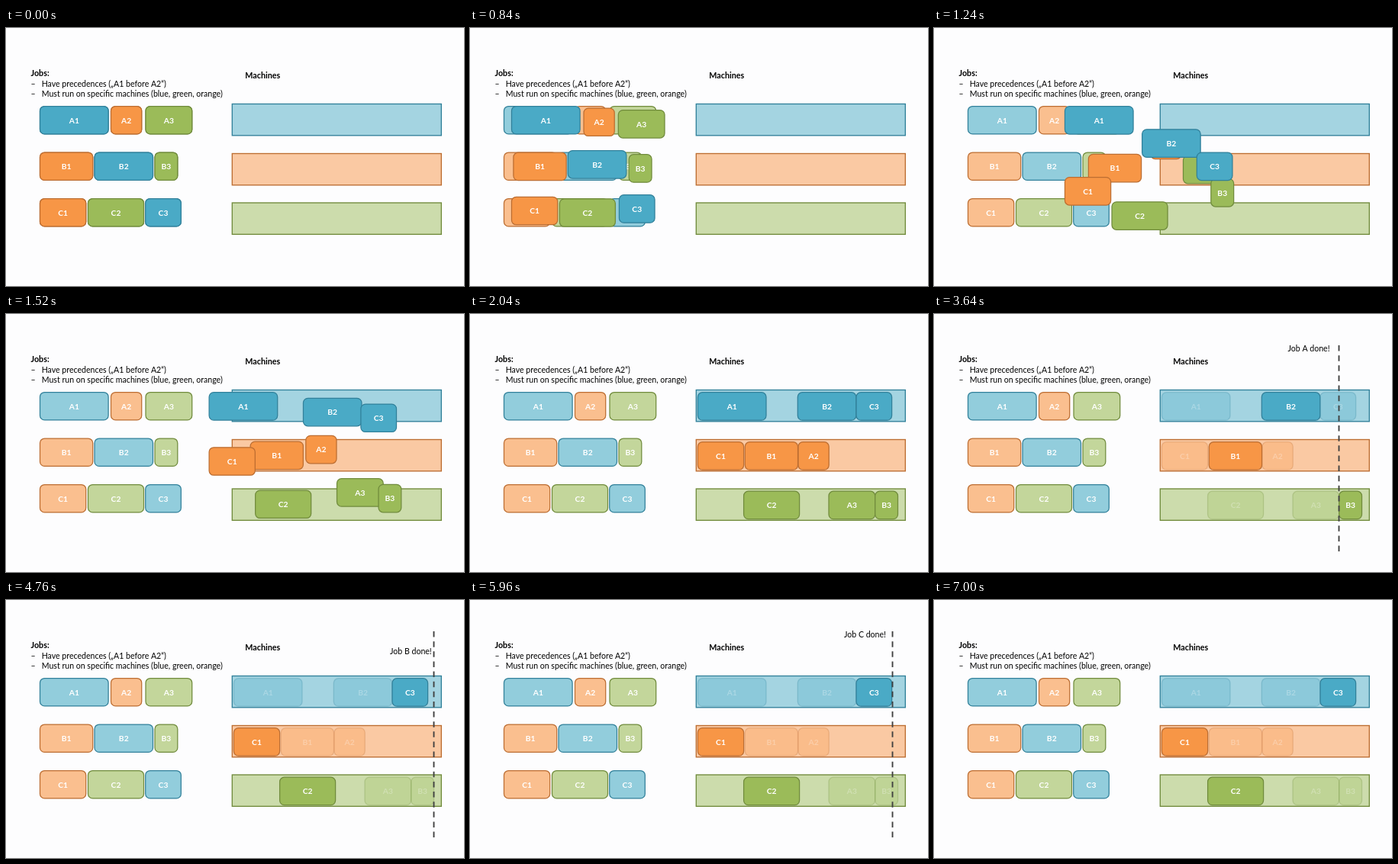
An HTML page with a canvas that plays this animation: 600 px wide and 338 px high, repeating every 7040 ms.

```html
<!DOCTYPE html>
<html lang="en">
<head>
<meta charset="utf-8">
<title>Job shop scheduling</title>
<style>
html, body { margin: 0; width: 100%; height: 100%; overflow: hidden; background: #fdfdfe; }
canvas { display: block; width: 600px; height: 338px; }
</style>
</head>
<body>
<canvas id="stage" width="600" height="338"></canvas>
<script>
const ctx = document.getElementById('stage').getContext('2d');
const LOOP = 7040, STEP = 40, FADE = 520;
const MOVE_START = 628, MOVE_END = 1852;
const FAMILY = 'Lato, "Open Sans", sans-serif';
const HEADING = `bold 10.75px ${FAMILY}`;
const BODY = `10.58px ${FAMILY}`;
const LABEL = `bold 10.3px ${FAMILY}`;

const colors = {
  blue: { fill: '#4aaac6', pale: '#92cddc', bar: '#a4d4e1', edge: '#31809a' },
  orange: { fill: '#f79646', pale: '#fabf8f', bar: '#fac9a3', edge: '#bc6d31' },
  green: { fill: '#9bbb59', pale: '#c3d69b', bar: '#ccdcac', edge: '#708b3c' }
};
const barTop = { blue: 99.5, orange: 164.5, green: 229 };
const rowTop = { A: 102.5, B: 163, C: 223.5 };

// name, color, start x, width, scheduled x
const tasks = [
  ['A1', 'blue', 44.5, 89.6, 298.4],
  ['A2', 'orange', 137.5, 40.2, 430],
  ['A3', 'green', 183, 60.7, 470],
  ['B1', 'orange', 44.5, 69.2, 360.3],
  ['B2', 'blue', 116, 76.5, 429.3],
  ['B3', 'green', 195, 29.8, 530.7],
  ['C1', 'orange', 44.5, 60.2, 298.4],
  ['C2', 'green', 107.5, 73, 358.6],
  ['C3', 'blue', 182.7, 46.6, 506]
].map(([name, color, x, w, toX]) => ({
  name, color, x, w, toX, job: name[0],
  y: rowTop[name[0]], toY: barTop[color] + 3.2
}));

const markers = [
  { job: 'A', x: 530.5, labelX: 463.5, labelY: 49, from: 2520, to: 3640 },
  { job: 'B', x: 560.5, labelX: 503, labelY: 71, from: 3640, to: 4760 },
  { job: 'C', x: 553.5, labelX: 490, labelY: 49, from: 4760, to: 5960 }
];

const clamp = v => Math.max(0, Math.min(1, v));
const mix = (a, b, p) => a + (b - a) * p;
const smoother = u => u * u * u * (u * (6 * u - 15) + 10);

function text(str, x, y, font = BODY, color = '#000', align = 'left') {
  ctx.font = font;
  ctx.fillStyle = color;
  ctx.textAlign = align;
  ctx.fillText(str, x, y);
}

function box(task, x, y, fill) {
  const h = 36.4;
  ctx.beginPath();
  ctx.roundRect(x, y, task.w, h, 6);
  ctx.fillStyle = fill;
  ctx.fill();
  ctx.strokeStyle = colors[task.color].edge;
  ctx.lineWidth = 1.25;
  ctx.stroke();
  text(task.name, x + task.w / 2, y + h / 2 + 3.8, LABEL, '#fff', 'center');
}

function drawBackdrop() {
  ctx.fillStyle = '#fdfdfe';
  ctx.fillRect(0, 0, 600, 338);
  text('Jobs:', 32.5, 62.7, HEADING);
  text('–', 32.5, 76.5);
  text('Have precedences („A1 before A2“)', 46.7, 76.5);
  text('–', 32.5, 89.8);
  text('Must run on specific machines (blue, green, orange)', 46.7, 89.8);
  text('Machines', 313.3, 65.5, HEADING);
  for (const [name, top] of Object.entries(barTop)) {
    ctx.fillStyle = colors[name].bar;
    ctx.fillRect(296.3, top, 274, 41.3);
    ctx.strokeStyle = colors[name].edge;
    ctx.lineWidth = 1.35;
    ctx.strokeRect(296.3, top, 274, 41.3);
  }
  for (const task of tasks) box(task, task.x, task.y, colors[task.color].pale);
}

function drawTasks(t) {
  const p = smoother(clamp((t - MOVE_START) / (MOVE_END - MOVE_START)));
  const active = markers.filter(m => t >= m.from).pop();
  for (const task of tasks) {
    ctx.globalAlpha = !active || active.job === task.job ? 1 : 0.27;
    box(task, mix(task.x, task.toX, p), mix(task.y, task.toY, p), colors[task.color].fill);
  }
  ctx.globalAlpha = 1;
}

function drawMarker(m, t) {
  const alpha = clamp((t - m.from) / FADE) * (1 - clamp((t - m.to) / FADE));
  if (!alpha) return;
  const width = 1.875;
  ctx.globalAlpha = alpha;
  ctx.strokeStyle = '#404040';
  ctx.lineWidth = width;
  ctx.setLineDash([4 * width, 3 * width]);
  ctx.beginPath();
  ctx.moveTo(m.x, 41);
  ctx.lineTo(m.x, 312);
  ctx.stroke();
  ctx.setLineDash([]);
  text(`Job ${m.job} done!`, m.labelX, m.labelY);
  ctx.globalAlpha = 1;
}

const origin = performance.now();
function frame() {
  const elapsed = (performance.now() - origin) % LOOP;
  const t = Math.floor(elapsed / STEP) * STEP;
  drawBackdrop();
  drawTasks(t);
  markers.forEach(m => drawMarker(m, t));
  requestAnimationFrame(frame);
}
frame();
</script>
</body>
</html>
```
